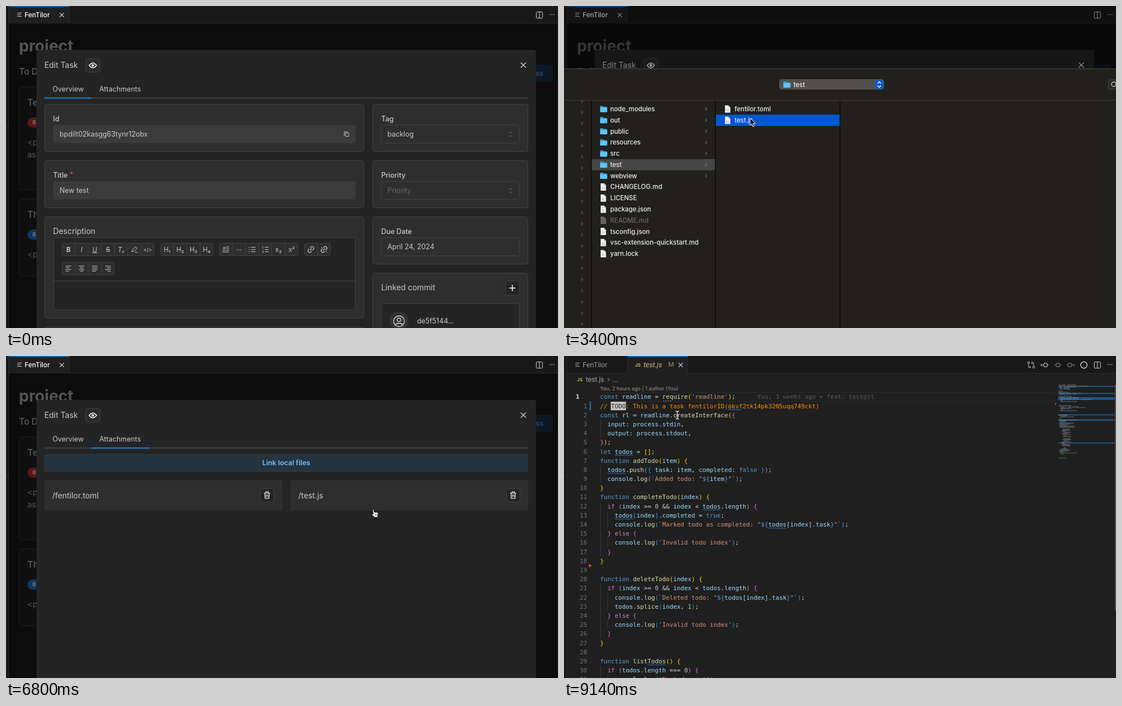
Recreate the animation shown at these times as an HTML page. Size 979x572 px, loop 9.28 s.

```html
<!DOCTYPE html>
<html lang="en">
<head>
<meta charset="utf-8">
<title>FenTilor</title>
<style>
html, body { margin: 0; width: 100%; height: 100%; overflow: hidden; background: #1f1f1f; }
svg { display: block; width: 979px; height: 572px; font-family: Inter, "Liberation Sans", sans-serif; }
text { white-space: pre; }
.mono { font-family: "DejaVu Sans Mono", "Liberation Mono", monospace; }
</style>
</head>
<body>
<svg id="stage" viewBox="0 0 979 572"></svg>
<script type="text/plain" id="code">
const readline = require('readline');
// TODO: This is a task fentilorID(okvf2tk14pk3205uqq749ckt)
const rl = readline.createInterface({
  input: process.stdin,
  output: process.stdout,
});
let todos = [];
function addTodo(item) {
  todos.push({ task: item, completed: false });
  console.log(`Added todo: "${item}"`);
}
function completeTodo(index) {
  if (index >= 0 && index < todos.length) {
    todos[index].completed = true;
    console.log(`Marked todo as completed: "${todos[index].task}"`);
  } else {
    console.log('Invalid todo index');
  }
}

function deleteTodo(index) {
  if (index >= 0 && index < todos.length) {
    console.log(`Deleted todo: "${todos[index].task}"`);
    todos.splice(index, 1);
  } else {
    console.log('Invalid todo index');
  }
}

function listTodos() {
  if (todos.length === 0) {
    console.log('No todos yet');
</script>
<script>
const $ = id => document.getElementById(id);
const lines = $('code').textContent.trim().split('\n');
const esc = s => s.replace(/&/g, '&amp;').replace(/</g, '&lt;');

// Drawing helpers; text is placed by the middle of its capitals.
const rect = (x, y, w, h, fill, more = '') =>
  `<rect x="${x}" y="${y}" width="${w}" height="${h}" fill="${fill}" ${more}/>`;
const box = (x, y, w, h, fill, line = '#424242', r = 4) =>
  rect(x + .5, y + .5, w - 1, h - 1, fill, `stroke="${line}" rx="${r}"`);
const raw = (x, y, html, size, fill, more = '') =>
  `<text x="${x}" y="${y + size * .36}" font-size="${size}" fill="${fill}" ${more}>${html}</text>`;
const text = (x, y, s, ...rest) => raw(x, y, esc(s), ...rest);
const path = (d, stroke, w = 1, more = '') =>
  `<path d="${d}" stroke="${stroke}" stroke-width="${w}" fill="none" ${more}/>`;
const group = (id, html, more = '') => `<g id="${id}" ${more}>${html}</g>`;
const cross = (x, y, r, c, w = 1.2) =>
  path(`M${x - r} ${y - r}l${2 * r} ${2 * r}m0 ${-2 * r}l${-2 * r} ${2 * r}`, c, w);
const bars = (x, y, ends, c, gap = 3) =>
  path(ends.map(([a, b], i) => `M${x + a} ${y + (i - (ends.length - 1) / 2) * gap}H${x + b}`).join(''), c, 1.2);
const chevron = (x, y, c, r = 2.5) => path(`M${x - r / 2} ${y - r}l${r} ${r}l${-r} ${r}`, c);
const BOLD = 'font-weight="600"', MED = 'font-weight="500"', MID = 'text-anchor="middle"';
const INK = '#c9c9c9';

function splitIcon(c) {
  return box(940, 10, 12, 12, 'none', c, 1) + path('M946 10V22', c) + text(963, 15, '···', 11, c, BOLD);
}

function frame() {
  return rect(0, 0, 979, 572, '#1f1f1f') + rect(0, 0, 979, 31, '#181818') + path('M0 30.5H979', '#2b2b2b') +
    rect(0, 0, 4, 572, '#181818') + path('M4.5 0V572', '#2b2b2b') + path('M0 213.5H4', '#333');
}

function boardTab() {
  return rect(5, 0, 107, 31, '#1f1f1f') + rect(5, 0, 107, 1.5, '#0078d4') + path('M112.5 0V30', '#2b2b2b') +
    bars(24, 15.5, [[-4, 4], [-4, 2], [-4, 4]], '#ccc') + text(33, 15.5, 'FenTilor', 11.7, '#fff', MED) +
    cross(99, 16, 3.7, '#ddd') + splitIcon('#ccc');
}

function page() {
  const g = '#555';
  const card = (y, h, name, pill, rows) => box(23, y, 90, h, '#0f0f0f', '#1e1e1e') +
    text(38, y + 28, name, 15.5, g, BOLD) + rect(38, y + 55, 40, 18, pill, 'rx="9"') +
    text(47, y + 64, 'B', 9, '#777', 'font-weight="700"') +
    rows.map((s, i) => text(38, y + 99 + i * 22, s, 14, g)).join('');
  return rect(5, 31, 974, 541, '#0c0c0c') + text(23, 71, 'project', 28, g, 'font-weight="700"') +
    text(23, 116, 'To Do', 15.5, g, BOLD) + card(143, 184, 'Test', '#5b1518', ['<p>', 'assign']) +
    card(342, 138, 'This', '#0c3761', ['<p>']) + rect(880, 104, 89, 31, '#0d1823', 'rx="4"') +
    text(953, 120, 'In Progress', 12.4, '#24507a', BOLD + ' text-anchor="end"');
}

function modal() {
  return rect(54, 78, 886, 500, '#242424', 'rx="4"') + text(68, 105, 'Edit Task', 13.9, INK) +
    box(141, 93, 26, 25, '#2a2a2a') +
    path('M147.500 105.500Q154 97 160.500 105.500Q154 114 147.500 105.500Z', '#fff', 1.4) +
    '<circle cx="154" cy="105.500" r="2.300" fill="#fff"/>' + cross(917.5, 105, 4.6, INK, 1.4) +
    rect(68, 162.5, 858, 2, '#424242') + rect(151, 132, 103, 31, '#2e2e2e', 'id="tabHover" rx="3"') +
    rect(68, 162.5, 83, 2, '#1c7ed6', 'id="tabLine"') +
    text(82.5, 147.5, 'Overview', 12.4, INK) + text(165.5, 147.5, 'Attachments', 12.4, INK);
}

function toolbar() {
  const glyphs = {
    mark: (x, y) => path(`M${x - 5} ${y + 4}l2 -4l5 -5l3 3l-5 5zM${x + 1} ${y + 5}h5`, INK),
    quote: (x, y) => bars(x, y, [[1, 6], [1, 6], [-6, 6], [-6, 6]], INK) + text(x - 6, y, '“', 12, INK, BOLD),
    ul: (x, y) => bars(x, y, [[-2, 6], [-2, 6], [-2, 6]], INK, 4) + bars(x, y, [[-6, -4], [-6, -4], [-6, -4]], INK, 4),
    ol: (x, y) => bars(x, y, [[-1, 6], [-1, 6], [-1, 6]], INK, 4) + text(x - 6, y - 3, '1', 6, INK) + text(x - 6, y + 4, '2', 6, INK),
    link: (x, y) => `<g transform="rotate(-45 ${x} ${y})">` +
      path(`M${x - 1} ${y - 3}h-2a3 3 0 0 0 0 6h2M${x + 1} ${y - 3}h2a3 3 0 0 1 0 6h-2M${x - 2.5} ${y}h5`, INK, 1.2) + '</g>',
    unlink: (x, y) => glyphs.link(x, y) + path(`M${x - 5} ${y - 3}h2M${x + 3} ${y + 4}h2`, INK),
    left: (x, y) => bars(x, y, [[-5, 5], [-5, 2], [-5, 5], [-5, 1]], INK),
    center: (x, y) => bars(x, y, [[-5, 5], [-3, 3], [-5, 5], [-3, 3]], INK),
    full: (x, y) => bars(x, y, [[-5, 5], [-5, 5], [-5, 5], [-5, 2]], INK),
    right: (x, y) => bars(x, y, [[-5, 5], [-2, 5], [-5, 5], [-1, 5]], INK)
  };
  const style = { B: 'font-weight="700"', I: 'font-style="italic"', U: 'text-decoration="underline"',
    S: 'text-decoration="line-through"', 'Tₓ': 'font-style="italic"' };
  const set = (x, y, names) => box(x, y, names.length * 23.4, 23, '#2e2e2e') + names.map((n, i) => {
    const cx = x + 11.7 + i * 23.4, cy = y + 11.5;
    return (i ? path(`M${x + i * 23.4} ${y}v23`, '#424242') : '') +
      (glyphs[n] ? glyphs[n](cx, cy) : text(cx, cy, n, n == '</>' ? 9 : 11.5, INK, `${MID} ${style[n] || ''}`));
  }).join('');
  return set(99, 421, ['B', 'I', 'U', 'S', 'Tₓ', 'mark', '</>']) + set(274, 421, ['H₁', 'H₂', 'H₃', 'H₄']) +
    set(378, 421, ['quote', '···', 'ul', 'ol', 'x₂', 'x²']) + set(529, 421, ['link', 'unlink']) +
    set(99, 455, ['left', 'center', 'full', 'right']);
}

function overview() {
  const card = (x, y, w, h, label, size = 12.4) => box(x, y, w, h, '#2e2e2e') +
    text(x + 15.5, y + 27 - (size > 13), label, size, INK, size > 13 ? '' : MED);
  const side = (y, label, value, fill, arrows) => card(650, y, 276, 85, label) + box(665, y + 37, 246, 33, '#2e2e2e') +
    text(676.5, y + 53.5, value, 12.4, fill) +
    (arrows ? path(`M892 ${y + 52}l2.500 -2.500l2.500 2.500m0 4l-2.500 2.500l-2.500 -2.500`, '#777') : '');
  const field = (y, label, value) => card(68, y, 567, 85, label) + rect(84, y + 37.5, 536, 32, '#3b3b3b', 'rx="3"') +
    text(95, y + 53.5, value, 12.4, INK);
  return field(174, 'Id', 'bpdilt02kasgg63tynr12obx') +
    box(601.5, 225, 7, 7, 'none', INK, 1) + path('M600 230.500V223.500H606', INK) +
    field(274, 'Title', 'New test') + text(113, 300, '*', 12.4, '#fa5252') +
    card(68, 374, 567, 181, 'Description', 13.9) + box(84, 411, 536, 129, '#242424') +
    path('M84 488.500H620', '#424242') + toolbar() + box(68, 569.5, 567, 30, '#2e2e2e') +
    side(174, 'Tag', 'backlog', INK, 1) + side(274, 'Priority', 'Priority', '#696969', 1) +
    side(374, 'Due Date', 'April 24, 2024', INK) + card(650, 474, 276, 140, 'Linked commit', 13.9) +
    box(885, 488, 26, 26, '#242424') + path('M892.500 501h11m-5.500 -5.500v11', '#fff', 1.6) +
    box(665, 528, 246, 80, '#242424') + '<circle cx="697" cy="560" r="17" fill="#333"/>' +
    '<g fill="none" stroke="#ddd" stroke-width="1.300"><circle cx="697" cy="560" r="9.500"/>' +
    '<circle cx="697" cy="557.500" r="3.200"/><path d="M690.500 566.500q2 -3 6.500 -3t6.500 3"/></g>' +
    text(729, 560, 'de5f5144...', 12.4, INK);
}

function attachment(x, name, id) {
  const tx = x + 395;
  return rect(x, 220.5, 422, 54, '#2e2e2e', `rx="4" id="${id}"`) + text(x + 14, 247.5, name, 13.9, INK) +
    box(tx - 12.5, 235, 25, 25, '#242424') +
    path(`M${tx - 5.5} 243.500h11M${tx - 4} 243.500l.7 9.500h6.600l.7 -9.500M${tx - 2} 243v-2h4v2M${tx - 1.3} 246v4.500m2.600 -4.500v4.500`, '#fff', 1.2);
}

function attachments() {
  return rect(68, 174, 858, 32, '#25343f', 'rx="4"') + text(497, 190, 'Link local files', 12.4, '#74c0fc', `${BOLD} ${MID}`) +
    attachment(68, '/fentilor.toml', 'cardA') + group('linked', attachment(504.5, '/test.js', 'cardB'));
}

function fileRow(x, y, name, isFile, dim) {
  const icon = isFile
    ? `<path d="M${x + 1} ${y - 6.5}h6l3.500 3.500v9.500h-9.500z" fill="#f2f2f2"/>` +
      path(`M${x + 7} ${y - 6.5}v3.500h3.500M${x + 3} ${y + 1}h5m-5 2.500h5`, '#999', .7)
    : `<path d="M${x} ${y - 4.5}q0 -1 1 -1h4l1.500 1.500h5q1 0 1 1v7.500q0 1 -1 1h-10.500q-1 0 -1 -1z" fill="#2f9fd8"/>` +
      rect(x, y - 2.5, 12.5, 8, '#5cc6f7', 'rx="1"');
  return `<g opacity="${dim ? .35 : 1}">${icon}${text(x + 18, y, name, 11.3, '#eee', MED)}</g>`;
}

function sheet() {
  const names = ['node_modules', 'out', 'public', 'resources', 'src', 'test', 'webview', 'CHANGELOG.md', 'LICENSE',
    'package.json', 'README.md', 'tsconfig.json', 'vsc-extension-quickstart.md', 'yarn.lock'];
  const rows = names.map((n, i) => {
    const y = 183 + i * 19.77;
    return (n == 'test' ? rect(49, y - 9.8, 219, 19.8, '#464646', 'id="testRow"') : '') +
      fileRow(64, y, n, i > 6, n == 'README.md') + (i < 7 ? chevron(252, y, '#999') : '');
  });
  let stubs = '';
  for (let i = 0; i < 21; i++) stubs += chevron(32, 169 + i * 19.8, '#888');
  const preview = box(553, 177, 500, 344, '#1d1d1c', '#383835', 5) + '<g clip-path="url(#previewClip)" class="mono">' +
    lines.map((s, i) => text(560, 185.7 + i * 11.7, s, 9.86, '#f4f4f4', 'font-weight="700"')).join('') + '</g>' +
    text(553, 555, 'test.js', 13, '#eee', BOLD) + text(553, 572.5, 'JavaScript script - 2 KB', 11.3, '#999');
  return rect(0, 111, 979, 461, '#21201c') + path('M0 111.500H979', '#454545') +
    rect(381.5, 130, 186, 18.5, '#504f4c', 'rx="5"') + fileRow(389, 139.5, 'test') +
    rect(552, 131, 14.5, 16.5, '#0a5cd8', 'rx="4"') + path('M556.500 137.500l2.700 -3l2.700 3m0 4l-2.700 3l-2.700 -3', '#fff', 1.4) +
    box(965, 130.5, 40, 18, '#2a2926', '#4a4946') + '<circle cx="975" cy="139" r="4" fill="none" stroke="#ccc" stroke-width="1.300"/>' +
    `<g clip-path="url(#listClip)">${stubs}</g>` + rows.slice(0, 3).join('') +
    `<g clip-path="url(#lowerClip)">${group('lowerRows', rows.slice(3).join(''))}</g>` +
    rect(269, 193, 220, 20, '#0058d0', 'id="fileRow"') + fileRow(284.5, 183, 'fentilor.toml', 1) + fileRow(284.5, 203, 'test.js', 1) +
    path('M0 167.500H979', '#3b3a36') + path('M48.500 168V572M268.500 168V572M489.500 168V572', '#080808', 1.4) +
    group('preview', preview);
}

// Syntax colours; bracket colours follow the nesting depth.
let depth = 0;
const span = (s, c) => `<tspan fill="${c}">${esc(s)}</tspan>`;
function paint(line) {
  const token = /(\/\/.*)|(`[^`]*`|'[^']*')|\b(const|let|function|true|false)\b|\b(if|else)\b|(\d+)|([()[\]{}])|(\w+)(?=\()|(\w+)|([^\w()[\]{}'`\/]+)/g;
  return line.replace(/TODO/, '').length < line.length && line.startsWith('//')
    ? span('// ', '#ff8c00') + span('TODO', '#222') + span(line.slice(7), '#ff8c00')
    : [...line.matchAll(token)].map(([s, , str, key, flow, num, br, fn, id]) => {
      if (str) {
        return s.split(/(\$\{[^}]*\})/).map(p => p.startsWith('${')
          ? span('${', '#569cd6') + span(p.slice(2, -1), '#9cdcfe') + span('}', '#569cd6') : span(p, '#ce9178')).join('');
      }
      if (br) {
        if (!'([{'.includes(br)) depth--;
        const c = ['#ffd700', '#da70d6', '#179fff'][(depth + 3) % 3];
        if ('([{'.includes(br)) depth++;
        return span(s, c);
      }
      return span(s, key ? '#569cd6' : flow ? '#c586c0' : num ? '#b5cea8' : fn ? '#dcdcaa' : id ? '#9cdcfe' : '#d4d4d4');
    }).join('');
}

const CW = 6.484, LH = 16.19;
const colX = c => 64 + c * CW, rowY = i => 59.2 + i * LH;

function squiggle(row, word) {
  const c = lines[row].indexOf(word);
  return path(`M${colX(c)} ${rowY(row) + 6.5}` + 'q1 -2 2 0t2 0'.repeat(Math.round(word.length * CW / 4)), '#3794ff', .9);
}

function codeView() {
  const folds = [2, 7, 11, 12, 15, 20, 21, 24, 29, 30];
  const rows = lines.map((s, i) => {
    const indent = s ? s.search(/\S/) / 2 : 0;
    let guides = '';
    for (let k = 0; k < indent; k++) guides += path(`M${colX(k * 2) + .5} ${rowY(i) - 8}v${LH}`, '#3a3a3a');
    return guides + raw(64, rowY(i), paint(s), 10.77, '#ccc') +
      (i ? text(41, rowY(i), '' + i, 10.77, '#6e7681', 'text-anchor="end"') : text(21, rowY(0), '1', 10.77, '#ddd', BOLD));
  }).join('');
  const marks = [[1, 'okvf'], [6, 'todos'], [8, 'todos'], [12, 'todos'], [13, 'todos'], [14, 'todos'], [29, 'Todos']];
  return path('M64 51.500H870M64 67.500H870', '#2b2b2b') + rect(colX(3) - .5, 68, 4 * CW + 1, 15, '#c8c8c8') + rows +
    marks.map(m => squiggle(...m)).join('') + path('M46.500 68v15.500', '#2188d8', 3, 'stroke-dasharray="1.500 1"') +
    '<path d="M44.500 355.500l4.500 3.500l-4.500 3.500z" fill="#f14c4c"/>' +
    group('blame', text(colX(43), rowY(0), 'You, 3 weeks ago • feat: testgit', 10.77, '#595959')) +
    group('block', rect(64, 51.5, 6.5, 15.5, '#aeafad') + text(64, rowY(0), 'c', 10.77, '#222')) +
    group('hint', path('M176 79.500h14', '#aaa', 1.3, 'stroke-dasharray="1.500 2.500"').replace('79.5', '66.5')) +
    group('folds', folds.map(i => path(`M50.500 ${rowY(i) - 1.5}l3.500 3.500l3.500 -3.500`, '#bbb')).join(''));
}

function minimap() {
  let seed = 7, out = '';
  const rnd = () => (seed = seed * 16807 % 2147483647) / 2147483647;
  const dash = (c, y, w, fill) => rect(877 + c * .9, y, w * .9, 1, fill, 'opacity=".65"');
  for (const [y, h] of [[53, 2], [65.5, 2], [73, 5], [103.5, 2], [112.5, 2.5], [153.5, 2]]) out += rect(876, y, 101, h, '#1b5585');
  for (let i = 0; i < 72; i++) {
    const y = 51 + i * 1.83;
    if (i < lines.length) {
      for (const m of lines[i].matchAll(/[\w'"`.]+/g)) dash && (out += dash(m.index, y, m[0].length, i == 1 ? '#c07a20' : '#8fa5b5'));
    } else if (i % 9 != 6 && i != 68 && i != 70) {
      const far = i > 42 && i < 63, at = i > 66 ? i < 68 ? 5 : 0 : far ? 6 + Math.floor(rnd() * 3) * 2 : 2;
      out += dash(at, y, 4 + rnd() * (far ? 14 : 34), i > 64 ? '#6a9955' : far && i % 3 == 0 ? '#ce7058' : '#8fa5b5');
    }
  }
  return out + rect(871, 84, 2, 2, '#f14c4c') + rect(977, 51, 2, 402, '#4a4a4a');
}

function editor() {
  const c = '#bbb', dimC = '#777';
  const commit = (x, color, d) => `<circle cx="${x}" cy="16" r="3.300" fill="none" stroke="${color}" stroke-width="1.200"/>` + path(d, color);
  return frame() + rect(112, 0, 108, 31, '#1f1f1f') + rect(112, 0, 108, 1.5, '#0078d4') +
    path('M112.500 0V30M219.500 0V30', '#2b2b2b') + bars(24, 15.5, [[-4, 4], [-4, 2], [-4, 4]], '#aaa') +
    text(33, 15.5, 'FenTilor', 11.7, '#9d9d9d') + text(126, 16, 'JS', 8, '#cbcb41', BOLD) +
    text(141, 15.5, 'test.js', 11.7, '#e2c08d', 'font-style="italic"') + text(185, 15.5, 'M', 11, '#a98f68') + cross(207, 16, 3.7, '#ddd') +
    text(23, 42, 'JS', 8, '#cbcb41', BOLD) + text(39, 42, 'test.js', 11.4, '#a9a9a9') + chevron(79, 42, '#a9a9a9', 3) + text(86, 42, '...', 11.4, '#a9a9a9') +
    '<g fill="none" stroke="#bbb"><circle cx="824" cy="12" r="1.700"/><circle cx="833" cy="20" r="1.700"/></g>' +
    path('M824 14v6h4m-2 -2l2 2l-2 2M833 18v-6h-4m2 -2l-2 2l2 2', c) +
    commit(854, c, 'M850.500 16h-5m2.500 -2.500l-2.500 2.500l2.500 2.500M857.500 16h2') +
    commit(876, dimC, 'M869.500 16h3M879.500 16h3') + commit(897, dimC, 'M891.500 16h2M900.500 16h5m-2.500 -2.500l2.500 2.500l-2.500 2.500') +
    '<circle cx="922" cy="16" r="5.800" fill="none" stroke="#ccc" stroke-width="1.400"/>' + splitIcon('#ccc') +
    group('codeArea', text(64, 58, 'You, 2 hours ago | 1 author (You)', 9, '#999', 'id="lens"') +
      group('rows', codeView(), 'class="mono"') + minimap());
}

const pointers = {
  arrow: '<path d="M0 0V13L3 10.300L5.200 15.300L7.400 14.300L5.300 9.500H9.300Z" fill="#111" stroke="#fff"/>',
  hand: '<path d="M0 1.200q1.200 -2 2.200 0l1 4.300q4.500 -.8 7 1.500l-.2 3.500l-1.300 4h-5l-5 -5q-.5 -1.500 1.500 -1l1.300 .6z" fill="#fff" stroke="#111" stroke-width=".9"/>' +
    path('M5 9v3m2 -3v3m2 -3v3', '#111', .7),
  beam: path('M-3 -7q3 0 3 2q0 -2 3 -2M0 -5V5M-3 7q3 0 3 -2q0 2 3 2M-1.500 1h3', '#ddd', 1.4)
};

$('stage').innerHTML = '<defs><clipPath id="previewClip"><rect x="553" y="178" width="426" height="342"/></clipPath>' +
  '<clipPath id="listClip"><rect y="168" width="48" height="404"/></clipPath>' +
  '<clipPath id="lowerClip"><rect y="232.500" width="268" height="340"/></clipPath></defs>' +
  group('board', frame() + boardTab() + page() + modal() + group('overview', overview()) + group('attach', attachments())) +
  rect(0, 0, 979, 572, '#000', 'id="dim"') + group('sheet', sheet()) + group('editor', editor()) +
  group('pointer', Object.entries(pointers).map(([k, v]) => group(k, v)).join(''));

const show = (id, on) => $(id).style.display = on ? '' : 'none';
const put = (id, x, y) => $(id).setAttribute('transform', `translate(${x} ${y})`);
const set = (id, name, value) => $(id).setAttribute(name, value);

// Pointer stops: time, x, y.
const stops = [[100, 753, 548], [300, 742, 535], [1000, 209, 156], [2000, 209, 156], [2300, 225, 184], [2700, 225, 184],
  [3300, 330, 199], [3500, 330, 199], [3900, 809, 542], [5500, 809, 542], [5800, 785, 552], [6200, 785, 552],
  [6500, 656, 316], [6600, 656, 316], [6800, 650, 272], [7000, 642, 264], [8200, 642, 264], [8700, 380, 400],
  [9000, 298, 443], [9100, 298, 443], [9140, 201, 105]];

function pointerAt(t) {
  const i = Math.max(1, stops.findIndex(s => s[0] >= t));
  const [a, b] = [stops[i - 1], stops[i]];
  const u = Math.min(1, Math.max(0, (t - a[0]) / (b[0] - a[0])));
  const e = u * u * (3 - 2 * u);
  return [a[1] + (b[1] - a[1]) * e, a[2] + (b[2] - a[2]) * e];
}

function draw(t) {
  const inEditor = t >= 7800, open = t >= 2500 && t < 5700, picked = t >= 3400;
  const hand = t >= 1000 && t < 2400 || t >= 6800 && t < 8300;
  show('board', !inEditor);
  show('editor', inEditor);
  show('overview', t < 1400);
  show('attach', t >= 1400);
  show('tabHover', t >= 1000 && t < 2100);
  set('tabLine', 'x', t < 1400 ? 68 : 151);
  set('tabLine', 'width', t < 1400 ? 83 : 103);
  show('linked', t >= 5800);
  set('cardB', 'fill', t >= 6900 ? '#353535' : '#2e2e2e');

  set('dim', 'opacity', t < 2400 || t >= 5800 ? 0 : t < 2500 || t >= 5700 ? .18 : .36);
  show('sheet', open);
  set('sheet', 'opacity', t < 2600 || t >= 5600 ? .7 : 1);
  put('lowerRows', 0, t < 2600 ? -14 : t < 2700 ? -6.6 : 0);
  set('testRow', 'fill', picked ? '#464646' : '#0058d0');
  show('fileRow', picked);
  show('preview', t >= 3500);

  const lens = t >= 8900;
  show('codeArea', t >= 7900);
  show('blame', t >= 8100);
  show('lens', lens);
  show('block', !lens);
  show('folds', !lens);
  show('hint', t >= 9140);
  put('rows', 0, lens ? 13.3 : 0);

  show('pointer', t >= 100);
  put('pointer', ...pointerAt(t));
  show('hand', hand);
  show('beam', t >= 8300);
  show('arrow', !hand && t < 8300);
}

function tick(now) {
  const t = now % 9280;
  draw(t >= 9140 ? 9140 : Math.floor(t / 100) * 100);
  requestAnimationFrame(tick);
}
draw(0);
requestAnimationFrame(tick);
</script>
</body>
</html>
```
